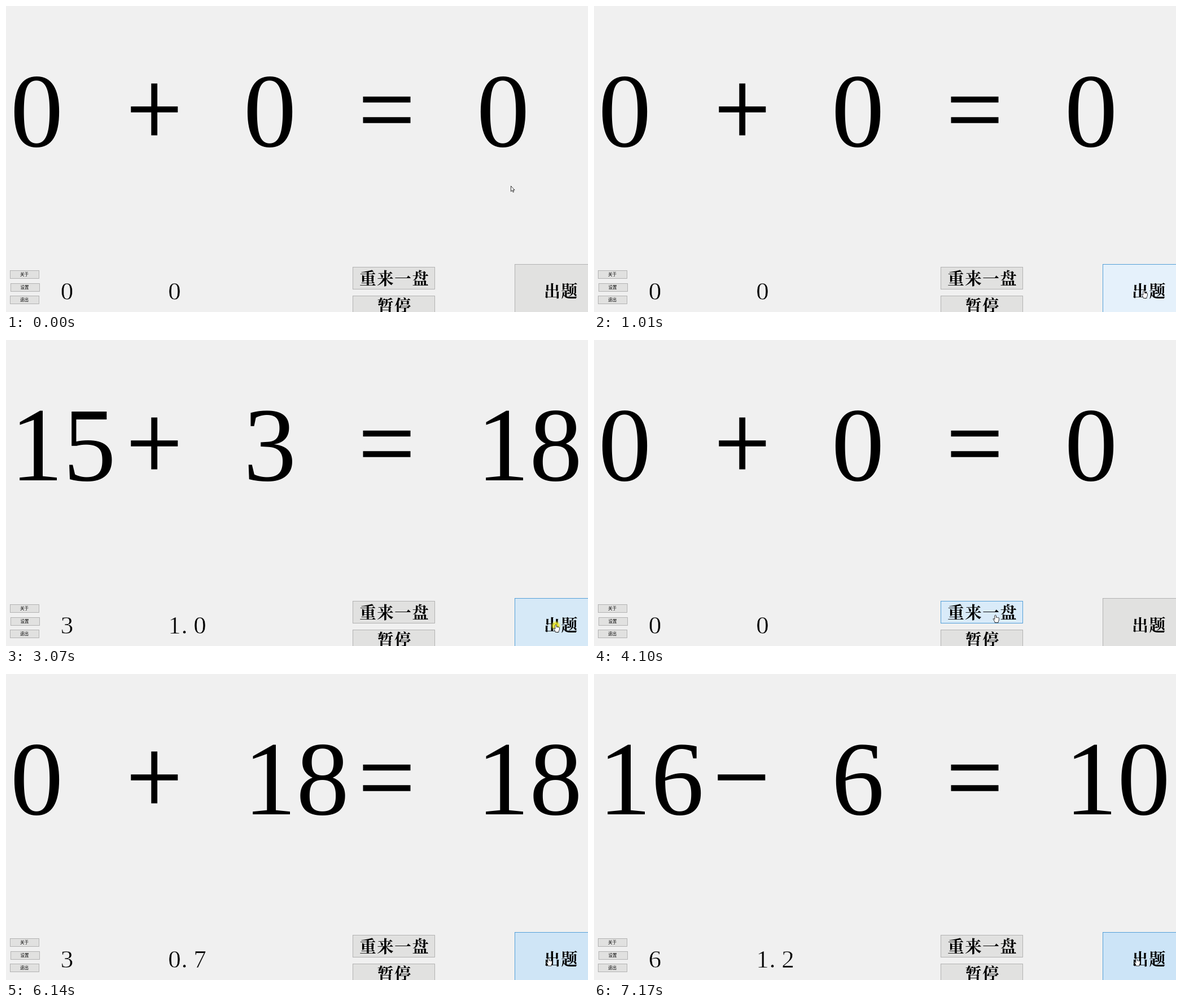
Recreate the animation shown at these times as an HTML page. Size 1031x543 px, loop 8000 ms.

```html
<!DOCTYPE html>
<html lang="zh">
<head>
<meta charset="utf-8">
<title>算术练习</title>
<style>
html, body { margin: 0; width: 100%; height: 100%; overflow: hidden; background: #f0f0f0; }
svg { display: block; width: 100%; height: 100%; }
text { text-anchor: middle; fill: #000; }
.num { font-family: SimSun, "Liberation Serif", serif; }
.thin { stroke: #f0f0f0; stroke-width: .6; }
.label { font-family: "Noto Serif CJK SC", "Noto Sans CJK SC", "Noto Sans CJK", serif; font-weight: 600; letter-spacing: 1.5px; }
.small { font-family: "Noto Sans CJK SC", "Noto Sans CJK", sans-serif; }
.cursor { fill: #fff; stroke: #000; stroke-width: .8; stroke-linejoin: round; }
</style>
</head>
<body>
<svg viewBox="0 0 1031 543">
  <defs>
    <radialGradient id="glow">
      <stop offset=".5" stop-color="#f2ee20" stop-opacity=".85"/>
      <stop offset="1" stop-color="#f2ee20" stop-opacity="0"/>
    </radialGradient>
  </defs>
  <rect width="1031" height="543" fill="#f0f0f0"/>
  <g id="buttons"></g>
  <g id="numbers"></g>
  <path id="operator"/>
  <path d="M632.5 160.7h84v10.6h-84zM632.5 197.2h84v10.6h-84z"/>
  <circle id="click" r="9" fill="url(#glow)"/>
  <path id="arrow" class="cursor" transform="translate(894.5 319.5)" d="M0 0V9.6L2.2 7.6L3.8 11L5.2 10.3L3.7 7H6.6Z"/>
  <path id="hand" class="cursor" d="M-1.2 1v7l-1.3-1.4q-1-.6-1.6.3l3.2 5.2v1.4h6v-1.5l1.3-3v-4q-.8-1-1.5 0q-.6-1.2-1.7-.3q-.6-1.1-1.8-.2V1q-1.1-1.8-2.6 0z"/>
</svg>
<script>
const NS = "http://www.w3.org/2000/svg";
const LOOP = 8000;
const $ = id => document.getElementById(id);

function add(parent, tag, attrs) {
  const el = document.createElementNS(NS, tag);
  set(el, attrs);
  return parent.appendChild(el);
}

function set(el, attrs) {
  for (const k in attrs) el.setAttribute(k, attrs[k]);
}

function button(label, x, y, w, h, size, cx, cy, cls = "label") {
  const box = add($("buttons"), "rect", { x: x + .5, y: y + .5, width: w, height: h, "stroke-width": .9 });
  const text = add($("buttons"), "text", { x: cx, y: cy + size * .38, "font-size": size, class: cls });
  text.textContent = label;
  paint(box, "#e1e1e0", "#adadad");
  return box;
}

function paint(box, fill, stroke) {
  set(box, { fill, stroke });
}

function number(x, y, size, cls = "") {
  const el = add($("numbers"), "text", { y, "font-size": size, class: "num " + cls });
  return value => {
    const chars = [...String(value)];
    // every character sits in a half-em cell; the point leans left
    el.setAttribute("x", chars.map((c, i) => x + i * size / 2 - (c === "." ? size * .11 : 0)).join(" "));
    el.textContent = value;
  };
}

button("关于", 7, 469, 51, 14, 7.5, 32.5, 476.5, "small");
button("设置", 8, 492, 51, 14, 7.5, 33, 499.5, "small");
button("退出", 7, 514, 51, 14, 7.5, 32.5, 521.5, "small");
const restart = button("重来一盘", 614, 463, 145, 39, 29.5, 688.3, 483);
button("暂停", 614, 514, 145, 39, 29, 688.3, 531.5);
const ask = button("出题", 901, 458, 145, 100, 29, 983.5, 505.5);

const left = number(54.5, 249, 187);
const right = number(467.5, 249, 187);
const result = number(880.5, 249, 187);
const score = number(108, 521, 45, "thin");
const clock = number(298.5, 521, 45, "thin");

const OPERATORS = {
  "+": "M221.3 178.2h83v10.6h-83zM257.3 137.6h10.8v92h-10.8z",
  "-": "M219.3 178.2h84v10.6h-84z"
};

const STATES = [
  { at: 0, sum: [0, "+", 0], score: 0, clock: "0" },
  { at: 1010, sum: [0, "+", 0], score: 0, clock: "0", hand: [974, 505], ask: "#e5f1fb" },
  { at: 2040, sum: [15, "+", 5], score: 1, clock: "0.5", hand: [974, 505], ask: "#d6e9f7", click: true },
  { at: 3070, sum: [15, "+", 3], score: 3, clock: "1.0", hand: [974, 505], ask: "#d6e9f7", click: true },
  { at: 4100, sum: [0, "+", 0], score: 0, clock: "0", hand: [711, 488], restart: "#d9ebf9" },
  { at: 5130, sum: [10, "+", 12], score: 1, clock: "0.1", hand: [971.5, 511], ask: "#dcedf8" },
  { at: 6140, sum: [0, "+", 18], score: 3, clock: "0.7", hand: [961, 504.5], ask: "#cfe5f6" },
  { at: 7170, sum: [16, "-", 6], score: 6, clock: "1.2", hand: [961, 504.5], ask: "#cce4f7" }
];

function show(s) {
  const [a, op, b] = s.sum;
  left(a);
  right(b);
  result(op === "+" ? a + b : a - b);
  score(s.score);
  clock(s.clock);
  $("operator").setAttribute("d", OPERATORS[op]);
  for (const [box, fill] of [[ask, s.ask], [restart, s.restart]])
    paint(box, fill || "#e1e1e0", fill ? "#4598d6" : "#adadad");
  $("arrow").style.display = s.hand ? "none" : "";
  $("hand").style.display = s.hand ? "" : "none";
  if (s.hand) $("hand").setAttribute("transform", `translate(${s.hand})`);
  set($("click"), { cx: 974, cy: 507, visibility: s.click ? "visible" : "hidden" });
}

let current;
const start = performance.now();

function tick() {
  const t = (performance.now() - start) % LOOP;
  const state = STATES.filter(s => s.at <= t).pop();
  if (state !== current) show(current = state);
  requestAnimationFrame(tick);
}
tick();
</script>
</body>
</html>
```
